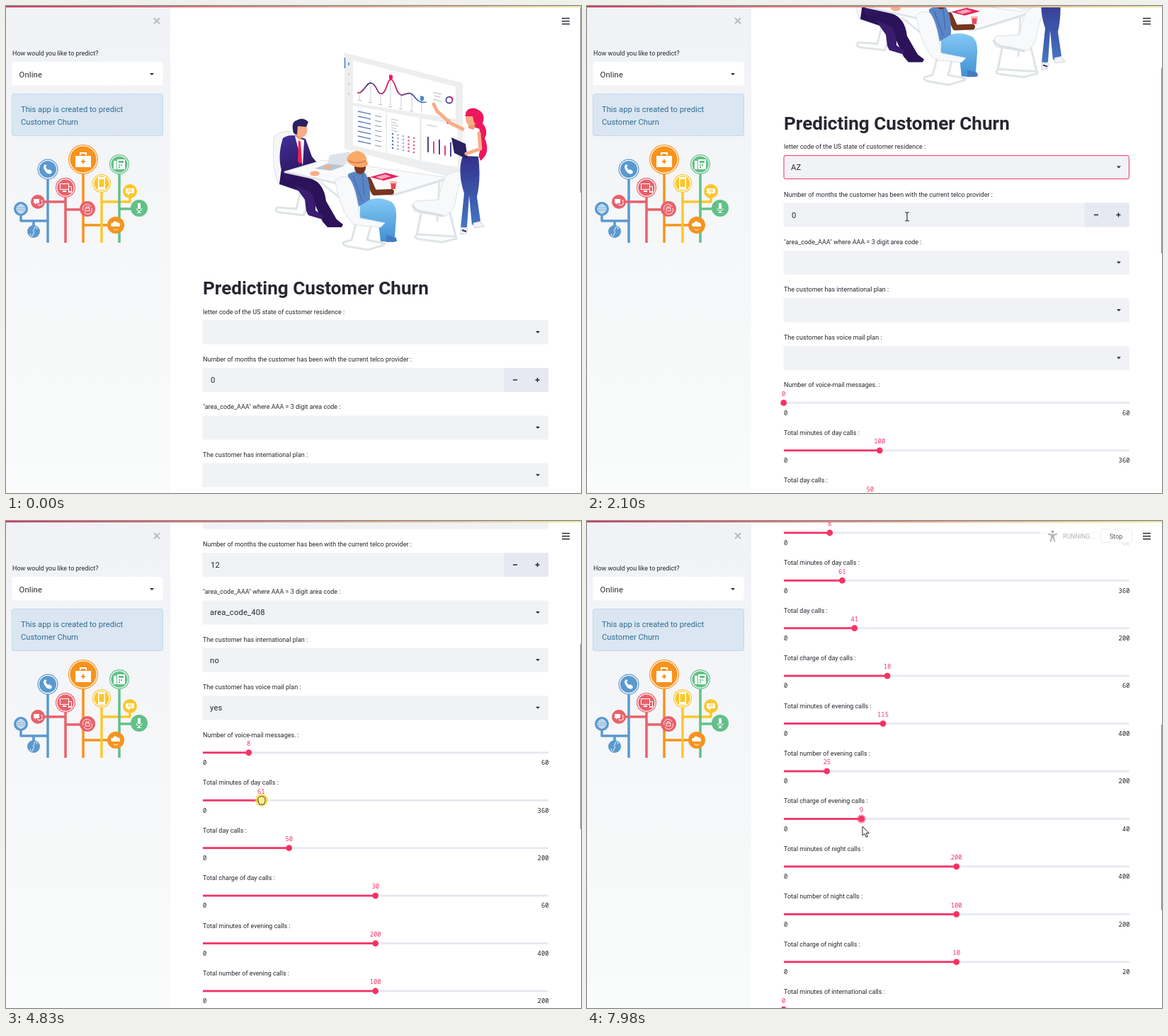
Write an HTML page that moves like this. It is 812x689 px and loops after 8000 ms.

```html
<!DOCTYPE html>
<html lang="en">
<head>
<meta charset="utf-8">
<title>Predicting Customer Churn</title>
<style>
html, body { margin: 0; width: 100%; height: 100%; overflow: hidden; background: #fff }
svg { display: block; width: 812px; height: 689px; font-family: Roboto, Inter, sans-serif; fill: #262730 }
.label { font-size: 9px }
.value { font-size: 11.2px; letter-spacing: .2px }
.num { font: 8.85px "Noto Sans Mono", "Liberation Mono", monospace }
.line { fill: none; stroke-linecap: round; stroke-linejoin: round }
.pink { fill: #f63366 }
</style>
</head>
<body>
<svg viewBox="0 0 812 689">
<defs>
  <linearGradient id="side" x2="0" y2="1"><stop stop-color="#f0f2f6"/><stop offset="1" stop-color="#fafcfb"/></linearGradient>
  <linearGradient id="bar"><stop stop-color="#d23a62"/><stop offset="1" stop-color="#ece8a4"/></linearGradient>
  <linearGradient id="suit" x2=".4" y2="1"><stop stop-color="#42309a"/><stop offset="1" stop-color="#2b1358"/></linearGradient>
  <linearGradient id="jeans" x2="0" y2="1"><stop stop-color="#84c9f5"/><stop offset="1" stop-color="#3f8fd2"/></linearGradient>
  <linearGradient id="slacks" x2="0" y2="1"><stop stop-color="#33308c"/><stop offset="1" stop-color="#4577c4"/></linearGradient>
  <linearGradient id="curve"><stop stop-color="#c2305f"/><stop offset=".15" stop-color="#333a86"/><stop offset=".45" stop-color="#ec1c5c"/><stop offset=".8" stop-color="#3f4f9c"/><stop offset="1" stop-color="#4a86cc"/></linearGradient>
</defs>
<rect width="812" height="689" fill="#fff"/>

<g id="page">
  <g id="art">
    <!-- board -->
    <path d="M478 66L645 109V247L478 202Z" fill="#eceeef"/>
    <path d="M490 77L635 114V160L490 137ZM490 141L536 149V208L490 197ZM538 150L584 158V218L538 208ZM587 159L638 168V228L587 219Z" fill="#fff"/>
    <path d="M478.500 73V88M484 80v4" stroke="#4b82c3" stroke-width="1.600"/>
    <path d="M484 95v3M484 109v3M484 123v3" stroke="#c7d2dc" stroke-width="2"/>
    <path d="M499 126v6M515 108v27M529 124v14M543 104v37M558 126v18M573 124v23M587 135v15" stroke="#b9c0ca" stroke-width=".8"/>
    <path class="line" d="M497 123C505 124 509 107 516 109C524 111 524 126 531 124C538 122 538 103 544 104C551 107 550 126 560 126C570 122 572 122 579 131Q585 138 593 136" stroke="url(#curve)" stroke-width="1.800"/>
    <path d="M541 97l5 1v5l-3 2-2-2z" fill="#ec1c5c"/><path d="M585 127l5 1v5l-3 2-2-2z" fill="#4a86cc"/>
    <path d="M497 133l5 1M512 136l5 1M526 139l5 1M540 142l5 1M555 145l5 1M570 148l5 1M603 122l12 3M605 127l8 2M603 132l12 3" stroke="#aeb7c1"/>
    <circle cx="626" cy="133" r="4.500" fill="none" stroke="#5b55a4" stroke-width="2"/>
    <path d="M626 128.500a4.500 4.500 0 0 1 4.500 4.500" fill="none" stroke="#ec1c5c" stroke-width="2"/>
    <g id="rows"></g><g id="dots"></g><g id="bars"></g>
    <path d="M622 160l5 1v4l-3 2-2-2z" fill="#ec1c5c"/>
    <!-- left chair and man -->
    <path d="M402 177Q377 178 378 190Q375 232 385 252L415 262L397 231L389 203Z" fill="#f4f6f7" stroke="#dde2e5"/>
    <path class="line" d="M386 251L424 264M416 263L410 287L383 285Q378 289 386 292L420 296L426 283" stroke="#dfe4e6" stroke-width="3"/>
    <path d="M389 230L430 244Q449 250 452 276L467 302L476 309L474 313H454L447 305L430 267L386 252Z" fill="#2c1359"/>
    <path d="M407 253L430 263Q438 275 437 289L448 297L447 302L427 296L424 290L422 274Z" fill="#3a1c70"/>
    <path d="M391 187Q400 181 411 184L423 188L432 213L446 230L440 238L422 232V242L396 248Q380 222 391 187Z" fill="url(#suit)"/>
    <path d="M408 184L421 190L419 226Z" fill="#fff"/><path d="M413 190l3 2 2 27-3 5-3-5z" fill="#ed1f55"/>
    <path d="M408 174v10l8 6 3-9z" fill="#ee9a70"/>
    <ellipse cx="417" cy="175" rx="8.500" ry="11" fill="#f8ad86"/>
    <path d="M406 180Q402 164 410 162Q419 156 427 164L424 171L412 170L411 182Z" fill="#29205f"/>
    <!-- table -->
    <path class="line" d="M612 246L609 304M445 250L482 280" stroke="#e2e6e8" stroke-width="3"/>
    <path d="M394 234L448 218L619 242L618 247L557 266L545 268Z" fill="#f9fafb" stroke="#dde3e5"/>
    <path class="line" d="M394 235L545 268L619 245" stroke="#dce2e5" stroke-width="2.500"/>
    <path d="M457 211L486 206L478 226L452 232Z" fill="#dde3e9"/><path d="M436 230L454 223L478 226L459 233Z" fill="#b8c5d3"/>
    <ellipse cx="436" cy="237" rx="7" ry="3.500" fill="#f8ad86"/><ellipse cx="454" cy="228" rx="5" ry="2.500" fill="#f8ad86"/>
    <path d="M514 242L536 236L555 241L533 247Z" fill="#e82058"/><path d="M522 242l13-4 9 3-14 4z" fill="#f7a2ba"/>
    <!-- seated woman -->
    <path d="M500 280Q523 266 544 277Q552 282 551 300L549 327L552 331L548 334L529 333L526 307L500 306Z" fill="url(#jeans)"/>
    <path d="M537 324l14 4 1 5-15 1z" fill="#4579c2"/>
    <path class="line" d="M512 246L520 264L544 263" stroke="#76351f" stroke-width="8"/>
    <path d="M483 238Q493 232 506 235Q515 245 514 274L494 286Q483 261 483 238Z" fill="#5a86c7"/>
    <path d="M490 240l13 36M503 237l3 30" stroke="#3d62a5"/>
    <ellipse cx="500" cy="228" rx="8" ry="10" fill="#76351f"/>
    <path d="M481 219Q482 207 496 205Q510 208 509 219Q515 225 505 228Q490 230 481 219Z" fill="#f8ab68"/>
    <path d="M484 219Q495 225 508 219" fill="none" stroke="#ec7e50" stroke-width="2"/>
    <path d="M543 249h8l-1 10h-6z" fill="#e9495d"/><path d="M542 248h10v3h-10z" fill="#f7b8ae"/>
    <path d="M465 248Q468 240 483 242Q494 253 500 300L535 307L529 313L492 310Q472 292 465 248Z" fill="#f7f9fa" stroke="#dce2e5"/>
    <path class="line" d="M494 309L488 331L477 334Q474 338 482 340L511 345L534 338M515 312L510 331L535 336" stroke="#dfe4e6" stroke-width="3"/>
    <!-- right chair -->
    <path d="M611 274Q616 239 629 236Q645 229 650 237Q639 246 634 280Q630 295 617 298L577 291Q571 280 579 276Z" fill="#f7f9fa" stroke="#dce2e5"/>
    <path d="M574 281Q577 291 595 292L618 297" fill="none" stroke="#d8dfe2" stroke-width="3"/>
    <path class="line" d="M586 294L580 324Q574 328 584 330L616 334L636 329L627 293M582 323L633 326" stroke="#dfe4e6" stroke-width="3"/>
    <!-- standing woman -->
    <path d="M649 151Q653 143 663 145Q679 151 673 166Q682 176 676 187Q685 208 670 219Q665 208 666 189Z" fill="#ee175c"/>
    <path class="line" d="M651 177L628 166L609 149L604 139" stroke="#f8ad86" stroke-width="5"/>
    <path d="M647 174Q656 169 668 174Q673 194 666 216L646 212Z" fill="#fff" stroke="#edeef2"/>
    <path d="M645 212L667 213Q671 244 665 270L670 304L658 310L654 268L651 313L642 314L647 265Q637 235 645 212Z" fill="url(#slacks)"/>
    <path d="M629 186L649 195L652 217L633 208Z" fill="#292160"/>
    <path class="line" d="M668 180L670 202L650 209" stroke="#f8ad86" stroke-width="5"/>
    <path d="M653 163v10l8 2 2-10z" fill="#ee9a70"/><ellipse cx="656" cy="160" rx="7" ry="9" fill="#f8ad86"/>
    <path d="M648 156Q651 147 659 145Q670 150 667 166L661 165L659 156Z" fill="#ee175c"/>
    <path d="M643 313l9 2-2 7-8 1z" fill="#f3f3f6" stroke="#cfd2d9"/><path d="M644 317l6 2" stroke="#29205f" stroke-width="2"/>
    <path d="M660 307l10-2 5 7-14 2z" fill="#f3f3f6" stroke="#cfd2d9"/>
  </g>
  <text x="278" y="408" font-size="26.100" font-weight="700">Predicting Customer Churn</text>
  <g id="fields"></g>
</g>

<g id="status">
  <rect x="640" y="8" width="134" height="26" fill="#fff" opacity=".8"/>
  <g fill="#b4b4b8"><circle cx="657.500" cy="15" r="2"/><path d="M651 17.500l5 1h3l5-1v2l-4 1v3l1.500 6h-2L658 24h-1l-1.500 5.500h-2l1.500-6v-3l-4-1z"/>
  <text x="672" y="24.500" font-size="8.800">RUNNING...</text></g>
  <rect x="725.500" y="11.500" width="44" height="19" rx="2.500" fill="#fff" stroke="#eceef2"/>
  <text x="738" y="24.500" font-size="9" fill="#55565e">Stop</text>
</g>
<path d="M785 17.500h11M785 21.500h11M785 25.500h11" stroke="#262730" stroke-width="1.500"/>
<rect id="thumb" x="811" width="1" height="262" fill="#85848c"/>

<rect width="232" height="689" fill="url(#side)"/>
<path d="M209 17l8 8M217 17l-8 8" stroke="#babbc1" stroke-width="2"/>
<text class="label" x="9" y="70">How would you like to predict?</text>
<rect id="mode" x="8.500" y="79" width="213" height="33.500" rx="2.500" fill="#fff"/>
<text class="value" x="18.500" y="100.500">Online</text>
<path d="M203 95h6l-3 3z"/>
<rect x="8.500" y="124.500" width="213" height="59" rx="2.500" fill="#dae6f2" stroke="#c3d9eb"/>
<g fill="#2f6d8f" font-size="11.200"><text x="21" y="149.500">This app is created to predict</text><text x="21" y="167.500">Customer Churn</text></g>
<g id="tree"></g>

<rect width="812" height="2" fill="url(#bar)"/>
<g id="cursor"></g>
</svg>

<script>
const $ = id => document.getElementById(id);
const STEP = 210, LOOP = 8000, LEFT = 278, WIDTH = 488, PINK = '#f63366';
const range = n => [...Array(n).keys()];

// Small marks on the board
$('rows').innerHTML = range(7).map(i =>
  `<path d="M497 ${149 + i * 7}l18 4" stroke="#5b78b8" stroke-width="1.3"/><path d="M521 ${155 + i * 7}l9 2" stroke="#8c90a8"/>`).join('') +
  range(5).map(i => `<path d="M544 ${160 + i * 4}l${i % 2 ? 7 : 10} 2" stroke="#b9c0ca"/>`).join('');
$('dots').innerHTML = range(25).map(i => {
  const c = i % 5, r = i / 5 | 0;
  return `<circle cx="${546 + c * 7.5}" cy="${181 + r * 5 + c * 1.5}" r="1.3" fill="${c > 2 ? '#ea5a80' : c ? '#a8afc4' : '#5b78b8'}"/>`;
}).join('');
$('bars').innerHTML = [22, 17, 21, 14, 20].map((h, i) =>
  `<path d="M${596 + i * 8} ${207 + i * 1.5}v${-h}" stroke="${i % 2 ? '#ea3f70' : '#48469b'}" stroke-width="2"/>`).join('') +
  '<path d="M594 168l14 3" stroke="#b9c0ca"/>';

// Sidebar tree
const BLUE = '#5a99cf', RED = '#e8616b', ORANGE = '#f7931e', YELLOW = '#fcc72c', GREEN = '#63c088';
const stems = [
  [BLUE, 'M59 245V335M59 304H21V296M39 304v8'], [RED, 'M84 271V335M54 277H84M84 288h22'],
  [ORANGE, 'M109 237V335M109 310h36'], [YELLOW, 'M135 264V335M135 277h40v-8'], [GREEN, 'M160 238V335M160 287h18']];
const nodes = [
  [59, 231, 14.5, BLUE, 'M-4-7q-4 3 0 9t9 4l1-3-4-3-2 1q-3-3-3-5l2-1z'],
  [84, 257, 14, RED, 'M-8-6H5V3H-8zM-4 4h5v2h-5zM4-2h5v9H4z'],
  [109, 217, 21, ORANGE, 'M-11-5H11V11H-11zM-5-6v-4H5v4H3v-2h-6v2z'],
  [135, 251, 13, YELLOW, 'M-5-9H5V9H-5z'],
  [160, 224, 14, GREEN, 'M-8-5h4V7h-4zM-3-7H8V7H-3z'],
  [45, 277, 10, RED, 'M-6-4H2V2H-2L-4 4V2H-6zM0-1'],
  [115, 287, 11, RED, ''], [175, 262, 10, YELLOW, 'M-6-4H6V3H0l-3 3V3h-3z'],
  [188, 286, 12, GREEN, 'M-2-7H2V1H-2zM-1 4h2v2h2v1h-6v-1h2z'],
  [155, 310, 12, ORANGE, 'M-6 2q-3-5 2-5q2-5 6-1q5 0 4 6z'],
  [21, 287, 10, BLUE, ''], [39, 319, 9, BLUE, '']];
const details = [
  ['M-7-5H4V2H-7zM5-1h3v6H5z', 84, 257, RED], ['M-1 0h2v2h2v2h-2v2h-2v-2h-2v-2h2z', 109, 217, ORANGE],
  ['M-3.500-6h7V5h-7z', 135, 251, YELLOW], ['M-1-5H6v3H-1zM-1 0h2v2h-2zM2 0h2v2h-2zM-1 3h2v2h-2z', 160, 224, GREEN]];
const wires = [
  ['M-6 0H6M0-6V6M-5-3H5M-5 3H5M-6 0a6 6 0 0 0 12 0a6 6 0 0 0-12 0M-3 0a3 6 0 0 0 6 0a3 6 0 0 0-6 0', 21, 287],
  ['M-4 3a2 2 0 1 0 3 1L1 0M4-3a2 2 0 1 0-3-1L-1 0', 39, 319],
  ['M-6 2a6 6 0 0 1 11-5M6-1a6 6 0 0 1-11 5M-3-1H3V3H-3zM-2-1v-2h4v2', 115, 287],
  ['M4-2h2v6h-2l-2 2v-2h-3', 45, 277], ['M-4 0q0 4 4 4t4-4', 188, 286], ['M-3 5a3 2 0 0 0 6 0', 155, 310]];
const at = (x, y) => `transform="translate(${x} ${y})"`;
$('tree').innerHTML =
  stems.map(([c, d]) => `<path d="${d}" fill="none" stroke="${c}" stroke-width="3.500" stroke-linejoin="round"/>`).join('') +
  nodes.map(([x, y, r, c, d]) => `<g ${at(x, y)}><circle r="${r}" fill="${c}"/>` +
    (r > 12 ? `<circle r="${r - 1.8}" fill="none" stroke="#fff" stroke-width="1.200"/>` : '') +
    `<path d="${d}" fill="#fff"/></g>`).join('') +
  details.map(([d, x, y, c]) => `<path d="${d}" ${at(x, y)} fill="${c}"/>`).join('') +
  wires.map(([d, x, y]) => `<path d="${d}" ${at(x, y)} fill="none" stroke="#fff" stroke-width=".9"/>`).join('') +
  `<path d="M-3-2H3M-3 0H3" ${at(175, 262)} stroke="${YELLOW}"/>`;

// Form: inputs [label, filled text, time], sliders [label, max, keys of time and value]
const inputs = [
  ['letter code of the US state of customer residence :', 'AZ', 1680],
  ['Number of months the customer has been with the current telco provider :', '12', 2520],
  ['"area_code_AAA" where AAA = 3 digit area code :', 'area_code_408', 2940],
  ['The customer has international plan :', 'no', 3360],
  ['The customer has voice mail plan :', 'yes', 3780]];
const sliders = [
  ['Number of voice-mail messages. :', 60, [[3990, 0], [4200, 1], [4410, 8]]],
  ['Total minutes of day calls :', 360, [[4620, 100], [4830, 61]]],
  ['Total day calls :', 200, [[5250, 50], [5460, 41]]],
  ['Total charge of day calls :', 60, [[5880, 30], [6090, 18]]],
  ['Total minutes of evening calls :', 400, [[6300, 200], [6720, 115]]],
  ['Total number of evening calls :', 200, [[6930, 100], [7350, 25]]],
  ['Total charge of evening calls :', 40, [[7560, 20], [7980, 9]]],
  ['Total minutes of night calls :', 400, [[0, 200]]],
  ['Total number of night calls :', 200, [[0, 100]]],
  ['Total charge of night calls :', 20, [[0, 10]]],
  ['Total minutes of international calls :', 20, [[0, 0]]]];

const scrollKeys = [[840, 0], [1260, 75], [1470, 77.8], [1680, 77.8], [2100, 233.4], [2940, 233.4], [3150, 311],
  [3360, 311], [3570, 389], [4410, 389], [4620, 467], [4830, 467], [5040, 545], [6090, 545], [6300, 622.3],
  [7560, 622.3], [7770, 778]];
const statusKeys = [[5460, 0], [5670, .1], [5880, 0], [7770, 0], [7980, 1]];
const focusKeys = [[0, -2], [420, -1], [1470, 0], [2310, 1], [2730, 2], [3150, 3], [3570, 4], [3990, 5],
  [4620, 6], [5250, 7], [5880, 8], [6300, 9], [7140, 10], [7770, 11]];
const pointerKeys = [
  [420, 206, 98, 'hand'], [840, 206, 98, 'hand'], [1260, 448, 295, 'arrow'], [1470, 460, 384, 'hand'],
  [1680, 460, 384, 'hand'], [1890, 452, 298, 'arrow'], [2100, 452, 298, 'beam'], [2520, 452, 298, 'beam'],
  [2730, 480, 363, 'hand'], [2940, 480, 363, 'hand'], [3150, 480, 353, 'hand'], [3570, 480, 343, 'hand'],
  [3780, 480, 343, 'hand'], [3990, 280, 405, 'open'], [4200, 293, 405, 'grab'], [4410, 343, 405, 'grab'],
  [4620, 413, 395, 'open'], [4830, 361, 395, 'grab'], [5250, 400, 385, 'open'], [5460, 378, 385, 'grab'],
  [5670, 494, 456, 'hand'], [5880, 522, 452, 'open'], [6090, 424, 452, 'grab'], [6300, 522, 442, 'open'],
  [6510, 470, 442, 'grab'], [6720, 418, 442, 'grab'], [6930, 519, 510, 'open'], [7140, 430, 510, 'grab'],
  [7350, 339, 510, 'grab'], [7560, 339, 510, 'open'], [7770, 455, 421, 'grab'], [7980, 389, 432, 'arrow']];

const ink = 'fill="#fff" stroke="#222" stroke-width="1" stroke-linejoin="round"';
const fist = 'M-5 0Q-6-3-4-4Q-3-6-1-5Q1-6 2-5Q4-5 5-3Q6 2 3 6H-3Q-5 3-5 0Z';
const shapes = {
  arrow: `<path d="M0 0V13l3-2.600 2.200 5 2.200-1-2.200-4.800H9.300z" ${ink}/>`,
  beam: '<path d="M-3-6h2l1 1 1-1h2M0-5V5M-3 6h2l1-1 1 1h2" fill="none" stroke="#333" stroke-width="1.200"/>',
  hand: `<path d="M-3-7q1.500-2 3 0v5l6 1.500q1 1 .500 4L5 9H-2L-6 2q0-2 3 0z" ${ink}/><path d="M0-2v3M2.500-1v2.500M4.800-.5V2" stroke="#222" stroke-width=".8"/>`,
  open: `<path d="M-3 6L-6.500 1q0-2 2.500 0L-4-4q1-2 2 0v-2q1-2 2 0q1-1 2 1q2-1 2 1v1q2-1 2 1Q7 3 4 7H-2z" ${ink}/><path d="M-2-4v4M0-5v5M2-5v5M4-3v3" stroke="#222" stroke-width=".8"/>`,
  grab: `<circle r="9" fill="#f4de3a" opacity=".8"/><path d="${fist}" fill="#fbf08c" stroke="#444"/>`
};

function span(keys, t) {
  const i = keys.findIndex(k => k[0] >= t);
  return i < 0 ? [keys.at(-1), keys.at(-1), 0] : i == 0 ? [keys[0], keys[0], 0]
    : [keys[i - 1], keys[i], (t - keys[i - 1][0]) / (keys[i][0] - keys[i - 1][0])];
}
function tween(keys, t, n = 1) {
  const [a, b, p] = span(keys, t);
  return a[n] + (b[n] - a[n]) * p;
}
const held = (keys, t) => keys.filter(k => k[0] <= t).at(-1);
const rowY = i => 432.5 + 67.45 * i;
const caption = (text, y) => `<text class="label" x="${LEFT}" y="${y + 3}">${text}</text>`;

function drawInput([label, text, from], i, t, focus) {
  const y = rowY(i), months = i == 1, mid = y + 29;
  const shown = t >= from ? text : months ? '0' : '';
  return caption(label, y) +
    `<rect x="277.500" y="${y + 12}" width="488.500" height="34" rx="2.500" fill="#f0f2f6"/>` +
    (months
      ? `<path d="M703 ${y + 12}h60.500q2.500 0 2.500 2.500v29q0 2.500-2.500 2.500H703z" fill="#e6e9f1"/>
         <path d="M716 ${mid}h6M747.500 ${mid}h6M750.500 ${mid - 3}v6" stroke="#262730" stroke-width="1.500"/>`
      : `<path d="M748 ${mid - 1.5}h6l-3 3z"/>`) +
    `<text class="value" x="${months ? 289 : 288}" y="${mid + 4}">${shown}</text>` +
    (focus == i ? `<rect x="278" y="${y + 12.5}" width="487.500" height="33" rx="2.500" fill="none" stroke="${PINK}"/>` : '');
}

function drawSlider([label, max, keys], i, t, focus) {
  const y = rowY(i + 5), v = Math.round(tween(keys, t)), x = LEFT - .3 + WIDTH * v / max, track = y + 25;
  return caption(label, y) +
    `<rect x="${LEFT}" y="${track - 1.4}" width="${WIDTH}" height="2.800" fill="#e6e9f1"/>
     <rect class="pink" x="${LEFT}" y="${track - 1.4}" width="${Math.max(0, x - LEFT)}" height="2.800"/>` +
    (focus == i + 5 ? `<circle class="pink" cx="${x}" cy="${track}" r="6.400" opacity=".45"/>` : '') +
    `<circle class="pink" cx="${x}" cy="${track}" r="4.400"/>
     <g class="num"><text class="pink" x="${x}" y="${y + 15.3}" text-anchor="middle">${v}</text>
     <text x="${LEFT}" y="${y + 42.3}">0</text><text x="766.500" y="${y + 42.3}" text-anchor="end">${max}</text></g>`;
}

function draw() {
  const t = Math.floor(performance.now() % LOOP / STEP) * STEP;
  const scroll = tween(scrollKeys, t), focus = held(focusKeys, t)[1], pointer = held(pointerKeys, t);
  $('page').setAttribute('transform', `translate(0 ${-scroll})`);
  $('thumb').setAttribute('y', 2 + scroll * .368);
  $('status').setAttribute('opacity', tween(statusKeys, t));
  $('mode').setAttribute('stroke', focus == -1 ? PINK : 'none');
  $('fields').innerHTML = inputs.map((f, i) => drawInput(f, i, t, focus)).join('') +
    sliders.map((f, i) => drawSlider(f, i, t, focus)).join('');
  $('cursor').innerHTML = pointer
    ? `<g ${at(tween(pointerKeys, t), tween(pointerKeys, t, 2))}>${shapes[pointer[3]]}</g>` : '';
  requestAnimationFrame(draw);
}
draw();
</script>
</body>
</html>
```
